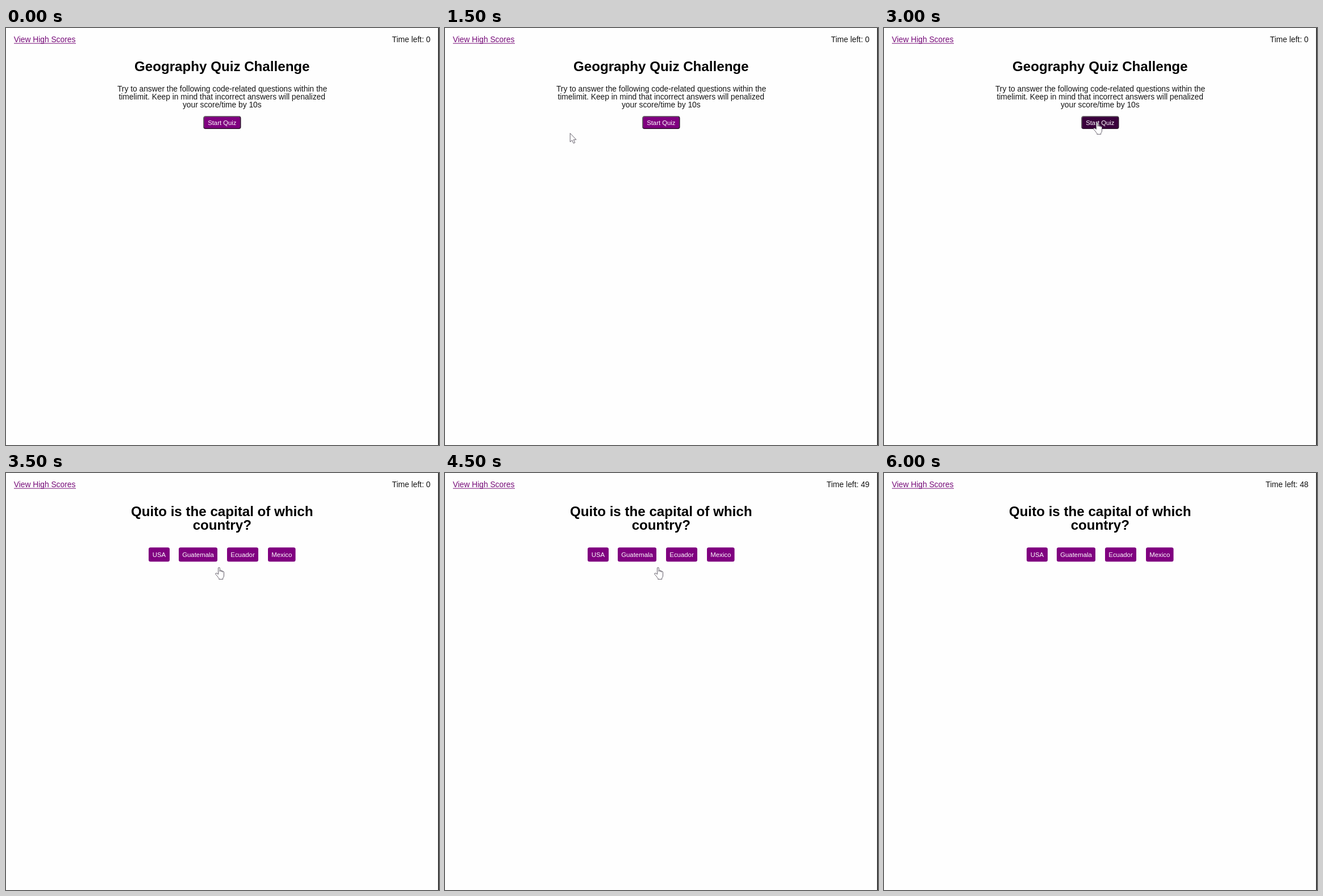
These frames come from a looping animation (762x735 px, 6500 ms). An HTML page:

```html
<!DOCTYPE html>
<html lang="en">
<head>
<meta charset="utf-8">
<title>Geography Quiz Challenge</title>
<style>
  html, body { margin: 0; width: 100%; height: 100%; overflow: hidden; background: #fefefe; }
  svg { display: block; }
  text { font: 13.8px "Liberation Sans", Arial, sans-serif; fill: #151515; }
  .mid { text-anchor: middle; }
  .title { font-size: 24.15px; font-weight: bold; fill: #000; }
  .label { font-size: 11.4px; fill: #fff; text-anchor: middle; }
  .cursor { fill: #fff; stroke: #55505c; stroke-width: .9; stroke-linejoin: round; }
</style>
</head>
<body>
<svg width="762" height="735" viewBox="0 0 762 735">
  <rect x="760.6" width="1.4" height="735" fill="#000"/>
  <text x="13.7" y="25.3" style="fill:#760a78">View High Scores</text>
  <rect x="14" y="26.6" width="109" height="1" fill="#760a78"/>
  <text id="timer" x="747" y="25.3" text-anchor="end">Time left: 0</text>

  <g id="intro">
    <text class="title mid" x="380.3" y="76.2">Geography Quiz Challenge</text>
    <text class="mid" x="380.5" y="112">Try to answer the following code-related questions within the</text>
    <text class="mid" x="380.2" y="126">timelimit. Keep in mind that incorrect answers will penalized</text>
    <text class="mid" x="380.3" y="139.7">your score/time by 10s</text>
    <rect x="347.3" y="155.3" width="66.2" height="22.7" rx="3.8" fill="#2a102a"/>
    <path d="M348 176V159q0-3 3-3H412" fill="none" stroke="#777" stroke-width="1.3"/>
    <rect id="start" x="348.8" y="156.8" width="63.2" height="19.7" rx="2.5"/>
    <text class="label" x="380.3" y="170.6" style="font-size:11.3px">Start Quiz</text>
  </g>

  <g id="question">
    <text class="title mid" x="380.2" y="76.2">Quito is the capital of which</text>
    <text class="title mid" x="380.3" y="100.3">country?</text>
  </g>

  <path id="arrow" class="cursor" d="M.5.5V15.8L4 12.7 6.4 18.2 9 17.1 6.6 11.8H11.3Z"/>
  <path id="hand" class="cursor" transform="translate(368 166)"
    d="M5.5 12.5V2q0-1.5 1.4-1.5T8.3 2V7.5 5.8q1.3-1 2.6.3V8 6.5q1.3-.8 2.4.4V8.8 7.6q1.8-.6 2.2 1V15q0 2.5-1.8 4.2V21.3H6.8V19.5Q5 18 3.8 15.8L.8 12.4Q.2 10.7 2 10.5 3.5 10.7 5.5 12.5Z"/>
</svg>
<script>
const LOOP = 6500;
const $ = id => document.getElementById(id);
const show = (id, on) => $(id).style.display = on ? "" : "none";

const answers = [["USA", 251, 37], ["Guatemala", 304, 68], ["Ecuador", 389, 55], ["Mexico", 461, 48.5]];
$("question").innerHTML += answers.map(([name, x, w]) =>
  `<rect x="${x}" y="131.2" width="${w}" height="25" rx="3.3" fill="#800080"/>
   <text class="label" x="${x + w / 2}" y="147.5">${name}</text>`).join("");

// The pointer jumps every half second
const steps = { 1500: [219.7, 185], 2000: [310, 171.5], 2500: [355.3, 173] };

function draw(now) {
  const t = now % LOOP;
  const tip = steps[Math.floor(t / 500) * 500];
  const left = t < 4500 ? 0 : t < 5500 ? 49 : 48;
  show("intro", t < 3500);
  show("question", t >= 3500);
  show("arrow", tip);
  show("hand", t >= 3000 && t < 6000);
  if (tip) $("arrow").setAttribute("transform", `translate(${tip})`);
  $("start").setAttribute("fill", t >= 3000 ? "#3a003c" : "#800080");
  $("timer").textContent = `Time left: ${left}`;
  requestAnimationFrame(() => draw(performance.now()));
}
draw(performance.now());
</script>
</body>
</html>
```
